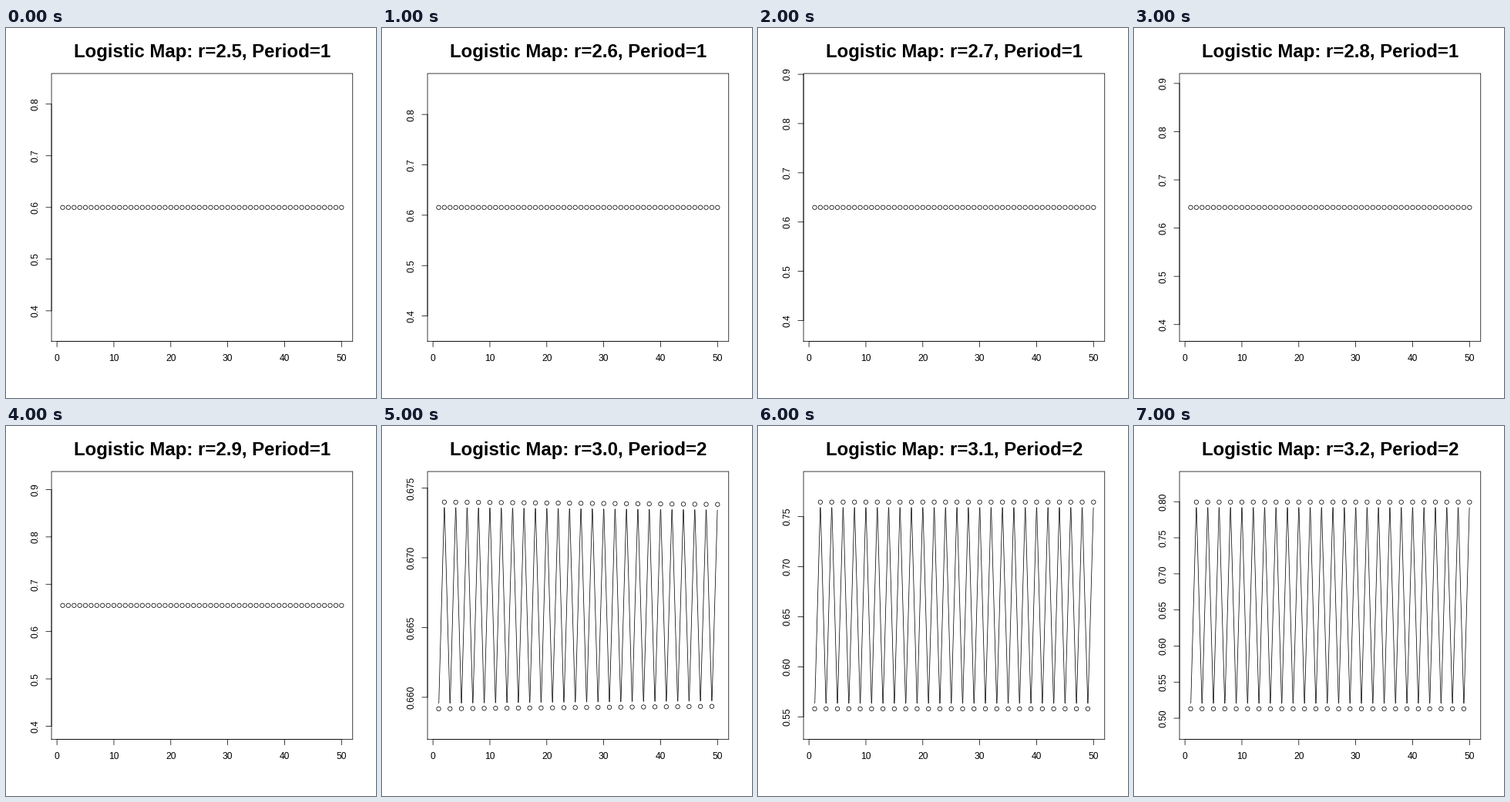
Recreate the animation shown at these times as a matplotlib script. Size 480 by 480 pixels, loop 8000 ms.

```python
import numpy as np
import matplotlib.pyplot as plt
from matplotlib.animation import FuncAnimation
from matplotlib.collections import LineCollection, PatchCollection
from matplotlib.patches import Circle

SIZE = 480
LEFT, RIGHT, TOP, BOTTOM = 59.04, 449.76, 59.04, 406.56
TICK = 7.2
GAP = 7.2
RADIUS = 2.7
LINE_WIDTH = 0.75
COUNT = 50
WARMUP = 1000

plt.rcParams["font.family"] = "Liberation Sans"
fig = plt.figure(figsize=(SIZE / 72, SIZE / 72), dpi=72, facecolor="white")
ax = fig.add_axes([0, 0, 1, 1])


def orbit(r):
    """Values of the logistic map after the warm-up."""
    x = 0.5
    values = []
    for n in range(WARMUP + COUNT):
        if n >= WARMUP:
            values.append(x)
        x = r * x * (1 - x)
    return np.array(values)


def y_limits(values):
    low, high = values.min(), values.max()
    spread = high - low
    pad = 0.1 * spread if spread > 1e-9 else 0.4 * high
    low, high = low - pad, high + pad
    margin = 0.04 * (high - low)
    return low - margin, high + margin


def scale(low, high, start, end):
    return lambda v: start + (v - low) / (high - low) * (end - start)


def y_ticks(low, high):
    step = next((s for s in (0.1, 0.05) if (high - low) / s > 3.8), 0.005)
    digits = {0.1: 1, 0.05: 2, 0.005: 3}[step]
    ticks = np.arange(np.ceil(low / step), np.floor(high / step) + 1) * step
    return ticks, digits


def add_lines(segments):
    lines = LineCollection(segments, colors="black", linewidths=LINE_WIDTH,
                           capstyle="round")
    lines.set_snap(False)
    ax.add_collection(lines, autolim=False)


def label(x, y, text, size=12, **style):
    ax.text(x, y, text, fontsize=size, ha="center", va="baseline",
            rotation_mode="anchor", **style)


def links(points):
    """Connecting lines that stop short of the points."""
    result = []
    for a, b in zip(points, points[1:]):
        length = np.hypot(*(b - a))
        if length > 2 * GAP:
            cut = (b - a) * GAP / length
            result.append([a + cut, b - cut])
    return result


def draw_frame(xpos, ypos, low, high):
    add_lines([[(LEFT, BOTTOM), (RIGHT, BOTTOM), (RIGHT, TOP),
                (LEFT, TOP), (LEFT, BOTTOM)]])

    xs = [xpos(v) for v in range(0, 51, 10)]
    add_lines([[(xs[0], BOTTOM), (xs[-1], BOTTOM)]])
    add_lines([[(x, BOTTOM), (x, BOTTOM + TICK)] for x in xs])
    for i, x in enumerate(xs):
        label(x, 432.4, str(10 * i))

    ticks, digits = y_ticks(low, high)
    ys = [ypos(v) for v in ticks]
    add_lines([[(LEFT, ys[0]), (LEFT, ys[-1])]])
    add_lines([[(LEFT, y), (LEFT - TICK, y)] for y in ys])
    for v, y in zip(ticks, ys):
        label(41.8, y, f"{v:.{digits}f}", rotation=90)


def update(i):
    ax.clear()
    ax.axis("off")
    ax.set(xlim=(0, SIZE), ylim=(SIZE, 0))

    r = (25 + i) / 10
    values = orbit(r)
    low, high = y_limits(values)
    xpos = scale(-0.96, 51.96, LEFT, RIGHT)
    ypos = scale(low, high, BOTTOM, TOP)
    points = np.column_stack([xpos(np.arange(1, COUNT + 1)), ypos(values)])

    add_lines(links(points))
    dots = PatchCollection([Circle(p, RADIUS) for p in points],
                           facecolor="none", edgecolor="black",
                           linewidths=LINE_WIDTH)
    dots.set_snap(False)
    ax.add_collection(dots, autolim=False)

    draw_frame(xpos, ypos, low, high)
    period = 1 if np.ptp(values) < 1e-9 else 2
    label((LEFT + RIGHT) / 2, 38.2, f"Logistic Map: r={r:.1f}, Period={period}",
          size=24, weight="bold")
    return []


anim = FuncAnimation(fig, update, frames=8, interval=1000, repeat=True,
                     repeat_delay=0, init_func=lambda: update(0))
plt.show()
```
